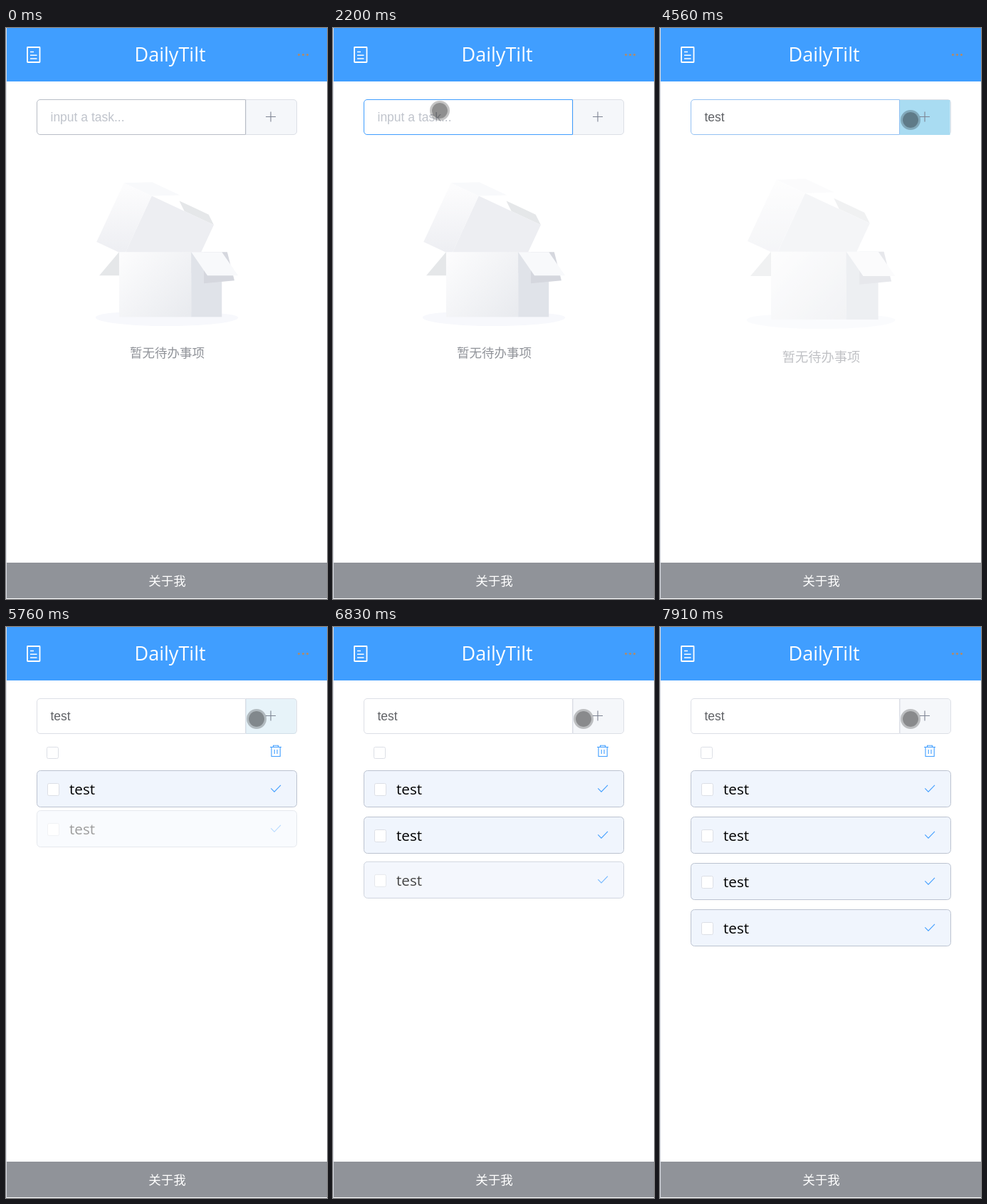
These frames come from a looping animation (451x801 px, 8 s). An HTML page:

```html
<!DOCTYPE html>
<html lang="zh-CN">
<head>
<meta charset="utf-8">
<title>DailyTilt</title>
<style>
html, body { margin: 0; width: 100%; height: 100%; overflow: hidden; background: #fff; }
svg { display: block; }
text { font-family: "Noto Sans CJK SC", "Noto Sans CJK", sans-serif; font-size: 17.5px; }
.ui { font-family: "Open Sans", "Noto Sans", sans-serif; }
.field { font-family: "Liberation Sans", Arial, sans-serif; }
.mid { text-anchor: middle; }
.icon { fill: none; stroke: #409eff; stroke-width: 1.1; }
.line { fill: #fff; stroke: #dcdfe6; }
</style>
</head>
<body>
<svg width="451" height="801" viewBox="0 0 451 801">
  <defs>
    <linearGradient id="side" x1=".389" y1="0" x2=".611" y2="1">
      <stop stop-color="#fcfcfd"/><stop offset="1" stop-color="#eeeff3"/>
    </linearGradient>
    <linearGradient id="front" x1="0" y1=".095" x2="1" y2=".905">
      <stop stop-color="#fcfcfd"/><stop offset="1" stop-color="#e9ebef"/>
    </linearGradient>
    <g id="item">
      <rect x="43.5" y="201.5" width="365" height="51" rx="5" fill="#f0f5fd" stroke="#bcc3d0"/>
      <rect class="line" x="58.5" y="219.5" width="16" height="17" rx="2"/>
      <text class="ui" x="89" y="235" style="font-size:20.7px">test</text>
      <path class="icon" d="M372.3 226.3l4.7 4.9 9-9.3"/>
    </g>
  </defs>

  <path d="M.5 0V801" stroke="#dcdfe6"/>
  <rect x="1" width="450" height="75" fill="#409eff"/>
  <g fill="none" stroke="#fff" stroke-width="1.8">
    <rect x="30" y="27" width="17.5" height="21" rx=".5"/>
    <path d="M34 33.5h5M34 38.2h9.5M34 43h9.5" stroke-width="1.6"/>
  </g>
  <text class="ui mid" x="230.5" y="47" fill="#fff" style="font-size:27px">DailyTilt</text>
  <g fill="#b08a6c">
    <circle cx="411.5" cy="37.5" r="1.6"/><circle cx="417.5" cy="37.5" r="1.6"/><circle cx="423.5" cy="37.5" r="1.6"/>
  </g>
  <rect x="1" y="750" width="450" height="50" fill="#909399"/>
  <text class="mid" x="226.5" y="782" fill="#fff">关于我</text>

  <g id="empty">
    <g transform="translate(126 200.3) scale(2.532)">
      <path fill="#f7f8fc" d="M39.5 86C61.3 86 79 83.9 79 81.3S57.3 78 35.5 78 0 78.8 0 81.3 17.7 86 39.5 86z"/>
      <path fill="#e5e7e9" d="M13 45H53L42 58H2z"/>
      <g transform="translate(34.5 31.5) scale(-1 1) rotate(-25) translate(-27.5 -21.5)">
        <path fill="#e5e7e9" d="M0 7H18L23 3H5z"/>
        <path fill="#edeef2" d="M0 7H38V43H0z"/>
        <rect x="-55" y="7" width="17" height="36" fill="url(#side)" transform="scale(-1 1)"/>
        <path fill="#f8f9fb" d="M55 7H38L24 0H41z"/>
      </g>
      <rect x="13" y="45" width="40" height="36" fill="url(#front)"/>
      <rect x="53" y="45" width="17" height="36" fill="#e0e3e9"/>
      <path fill="#d5d7de" d="M60 45H73L77 60.8 60 62.4z"/>
      <path fill="#f8f9fb" d="M53 45H70L79 58H62z"/>
    </g>
    <text class="mid" x="226.5" y="462" fill="#909399">暂无待办事项</text>
  </g>

  <path d="M337 100.5H404a4.5 4.5 0 0 1 4.5 4.5V145a4.5 4.5 0 0 1-4.5 4.5H337z" fill="#f5f7fa" stroke="#dcdfe6"/>
  <rect id="tap" x="337" y="101" width="70.5" height="49" fill="#a8dcf2"/>
  <path d="M365 124.5h14M372 117.5v14" stroke="#7d8493" stroke-width="1.1"/>
  <path id="box" d="M336.5 100.5H48a4.5 4.5 0 0 0-4.5 4.5V145a4.5 4.5 0 0 0 4.5 4.5H336.5z" fill="#fff"/>
  <text id="value" class="field" x="62.5" y="131"></text>
  <rect id="caret" y="115" width="1" height="20" fill="#303133"/>

  <g id="list">
    <rect class="line" x="57.5" y="168.5" width="16" height="16" rx="2"/>
    <path class="icon" d="M371 168.5h16M375.5 168v-1.8h7V168M373 168.5v13h12.2v-13M377.2 172v6M381 172v6"/>
  </g>
  <g id="cursor">
    <circle r="12.5" fill="none" stroke="#000" stroke-opacity=".23" stroke-width="3"/>
    <circle r="11" fill="#000" fill-opacity=".44"/>
  </g>
</svg>
<script>
const $ = id => document.getElementById(id);
const set = (el, attrs) => { for (const k in attrs) el.setAttribute(k, attrs[k]); };
const ramp = (t, a, b) => Math.min(1, Math.max(0, (t - a) / (b - a)));
const lerp = (a, b, p) => a + (b - a) * p;
const mix = (a, b, p) => `rgb(${a.map((v, i) => Math.round(lerp(v, b[i], p)))})`;

const HOVER = [184, 189, 198], FOCUS = [64, 158, 255], IDLE = [220, 223, 230];
const taps = [4370, 5530, 6370, 7290];
const fades = [[4690, 4700], [5530, 6140], [6370, 7010], [7290, 7910]];
// time, x, y
const path = [[300, 385, 730], [810, 159, 110], [1030, 159, 110], [1040, 155, 113], [1080, 155, 113],
  [1090, 150, 116], [3770, 150, 116], [3870, 306, 89], [4230, 352, 129]];
const keys = [[2790, "t", 67], [2940, "tes", 86], [3070, "test", 91]];

const items = fades.map(() => {
  const use = document.createElementNS("http://www.w3.org/2000/svg", "use");
  set(use, { href: "#item" });
  return $("list").appendChild(use);
});

function cursorAt(t) {
  let i = path.findIndex(k => k[0] > t);
  if (i < 0) i = path.length - 1;
  if (i < 1) return path[0].slice(1);
  const [a, b] = [path[i - 1], path[i]];
  let p = ramp(t, a[0], b[0]);
  if (i === 1) p = p * p * (3 - 2 * p);
  if (i === 8) p = 1 - (1 - p) ** 2;
  return [lerp(a[1], b[1], p), lerp(a[2], b[2], p)];
}

function draw(t) {
  set($("cursor"), { transform: `translate(${cursorAt(t)})`, opacity: t < 300 ? 0 : 1 });

  const key = keys.filter(k => t >= k[0]).pop();
  $("value").textContent = key ? key[1] : "input a task...";
  set($("value"), { fill: key ? "#606266" : "#c0c4cc" });
  const blinkStart = key ? key[0] : 1230;
  const lit = t >= 1230 && t < 4400 && Math.floor((t - blinkStart) / 495) % 2 === 0;
  set($("caret"), { x: key ? key[2] : 63, opacity: lit ? 1 : 0 });
  set($("box"), { stroke: t < 4000 ? mix(HOVER, FOCUS, ramp(t, 1210, 1410)) : mix(FOCUS, IDLE, ramp(t, 4400, 4700)) });

  const since = t - (taps.filter(s => t >= s).pop() ?? -1e4);
  set($("tap"), { opacity: ramp(since, 0, 50) * (1 - ramp(since, 190, 240)) });

  const p = ramp(t, 4430, 4730), s = 1 + p / 10;
  set($("empty"), {
    transform: `translate(226 325) scale(${s}) translate(-226 -325)`,
    opacity: t < 4700 ? 1 - p : 0
  });

  set($("list"), { opacity: t < 4700 ? 0 : 1 });
  items.forEach((el, i) => {
    const q = ramp(t, ...fades[i]);
    set(el, { y: i * 65 - 20.5 * (1 - q) ** 1.75, opacity: q });
  });
}

const start = performance.now();
function loop() {
  draw((performance.now() - start) % 8000);
  requestAnimationFrame(loop);
}
loop();
</script>
</body>
</html>
```
